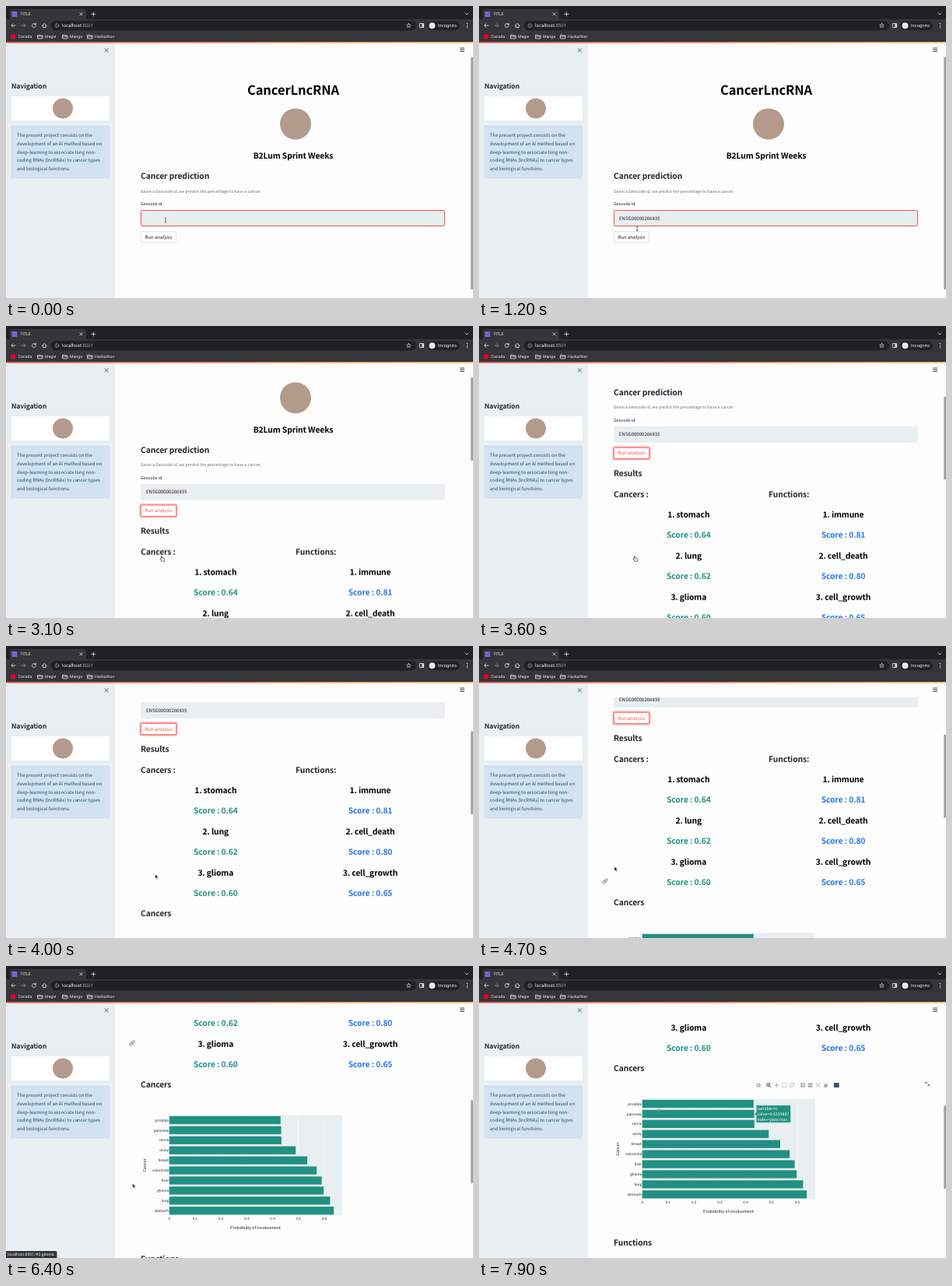
An HTML page that plays this animation: 600x375 px, repeating every 8 s.

```html
<!DOCTYPE html>
<html lang="en">
<head>
<meta charset="utf-8">
<title>Cancer prediction</title>
<style>
@property --s { syntax: "<number>"; inherits: true; initial-value: 0; }
html, body { margin: 0; width: 100%; height: 100%; overflow: hidden; background: #fdfdfd; }
svg { display: block; width: 600px; height: 375px; animation: scroll 8s linear infinite; }
text { font: 6.04px "Noto Sans CJK JP", "Noto Sans CJK SC", "Noto Sans CJK", "Open Sans", sans-serif; fill: #16171f; text-rendering: geometricPrecision; }
.ui { font-family: Roboto, sans-serif; font-size: 5.2px; fill: #e8eaed; }
.h1 { font-size: 16.5px; font-weight: 700; letter-spacing: -.005em; fill: #000; }
.h2 { font-size: 10.35px; font-weight: 700; letter-spacing: -.012em; fill: #262730; }
.nav { font-size: 8.6px; }
.black { fill: #000; }
.teal { fill: #229182; }
.blue { fill: #2b78e4; }
.info { fill: #12506a; font-size: 5.98px; }
.small { font-size: 5.25px; }
.tick { font-size: 4.57px; }
.grey { fill: #686b72; }
.white { fill: #fff; }
.mid { text-anchor: middle; }
.end { text-anchor: end; }
.red { fill: #ff4b4b; }
.line { fill: none; stroke: #e8eaed; stroke-width: .8; stroke-linecap: round; stroke-linejoin: round; }
.dim { stroke: #8a8e93; }
.tool { fill: none; stroke: #a9adb4; stroke-width: .9; }
#page { transform: translateY(calc(var(--s) * -1px)); }
#thumb { transform: translateY(calc(var(--s) * .33px)); }
#mouse { animation: mouse 8s linear infinite; }
@keyframes scroll {
  0%, 33.75% { --s: 0; }
  45% { --s: 133; }
  51.25%, 67.5% { --s: 204; }
  73.75% { --s: 297; }
  80% { --s: 381; }
  83.75%, 100% { --s: 402; }
}
@keyframes mouse {
  0%, 12% { transform: translate(205px, 275px); }
  18.5%, 46% { transform: translate(201px, 299px); }
  57.5%, 59.5% { transform: translate(174px, 284px); }
  63%, 78% { transform: translate(163px, 282px); }
  79%, 86% { transform: translate(162.5px, 280px); }
  90% { transform: translate(195px, 235px); }
  96%, 100% { transform: translate(231px, 185px); }
}
</style>
</head>
<body>
<svg id="stage" viewBox="0 0 600 375" xmlns="http://www.w3.org/2000/svg"></svg>
<script>
const LOOP = 8000;
const rules = new Map();

const text = (x, y, str, cls = "", attr = "") =>
  `<text x="${x}" y="${y}" class="${cls}" ${attr}>${str}</text>`;
const rect = (x, y, w, h, fill, attr = "") =>
  `<rect x="${x}" y="${y}" width="${w}" height="${h}" fill="${fill}" ${attr}/>`;
const dot = (x, y, r, fill) => `<circle cx="${x}" cy="${y}" r="${r}" fill="${fill}"/>`;
const path = (d, cls, attr = "") => `<path d="${d}" class="${cls}" ${attr}/>`;
const each = (list, fn) => list.map(fn).join("");

// Shows its content only within the given [from, to] spans, in ms.
function during(spans, content) {
  const name = "w" + spans.flat().join("_");
  const pct = ms => ms / LOOP * 100 + "%";
  rules.set(name, `@keyframes ${name}{0%{opacity:0}` +
    each(spans, ([a, b]) => `${pct(a)}{opacity:1}` + (b < LOOP ? `${pct(b)}{opacity:0}` : "")) + "}");
  return `<g style="animation:${name} 8s step-end infinite">${content}</g>`;
}

function browser() {
  const folder = x => path(`M${x} 37.2h2l.8.8h3.2v3.8h-6zM${x} 39h6`, "line");
  return rect(0, 0, 600, 18, "#202124") +
    path("M2 18q3 0 3-3V7q0-3 3-3h92q3 0 3 3v8q0 3 3 3z", "", 'fill="#35363a"') +
    rect(0, 17, 600, 29, "#35363a") +
    rect(7.5, 7, 7, 7, "#7a5cd6", 'rx="1"') + text(18.5, 12.4, "TITLE", "ui") +
    path("M95 8.8l3.2 3.2m0-3.2L95 12M109.8 10.4h5m-2.5-2.5v5M590 9l2 2 2-2", "line") +
    path("M12 25H7m2.2-2.3L6.9 25l2.3 2.3", "line") +
    path("M20 25h5m-2.2-2.3L25.1 25l-2.3 2.3", "line dim") +
    path("M38 23.6a2.5 2.5 0 1 0 .3 2.1M38.4 22v1.9h-1.9M46.5 25l2.8-2.6 2.8 2.6m-4.7-.5v3h3.8v-3", "line") +
    rect(58, 19, 469, 12.5, "#202124", 'rx="6.2"') +
    '<circle cx="65.5" cy="25.2" r="2.4" class="line dim"/>' + path("M65.5 25v1.4m0-2.5v0", "line dim") +
    text(72, 27.3, 'localhost<tspan fill="#9aa0a6">:8501</tspan>', "ui", 'style="font-size:6.1px"') +
    path("M517.5 22.3l.8 1.9 2 .1-1.6 1.3.6 2-1.8-1.1-1.8 1.1.6-2-1.6-1.3 2-.1z", "line", 'style="stroke-width:.6"') +
    path("M531.8 22.5h4.8v5h-4.8z", "line") + rect(534.5, 22.5, 2.2, 5, "#e8eaed") +
    rect(541, 19.5, 42, 11.5, "#202124", 'rx="5.7"') + dot(547.5, 25.2, 4, "#e8eaed") +
    text(555, 27.2, "Incognito", "ui", 'style="font-size:5.75px"') +
    each([22.5, 25, 27.5], y => dot(592.5, y, .7, "#e8eaed")) +
    rect(6, 36, 6, 6, "#e60023", 'rx="1"') + text(15.6, 41.2, "Canada", "ui") +
    each([[41, "Magie"], [73, "Manga"], [105, "Hackathon"]],
      ([x, s]) => folder(x) + text(x + 9, 41.2, s, "ui"));
}

function sidebar() {
  const lines = ["The present project consists on the", "development of an AI method based on",
    "deep-learning to associate long non-", "coding RNAs (lncRNAs) to cancer types", "and biological functions."];
  return rect(0, 46, 140, 329, "#e9eef1") +
    path("M127 54.6l4.6 4.6m0-4.6L127 59.2", "", 'stroke="#85888d" stroke-width="1.1"') +
    text(7, 106, "Navigation", "h2 nav") +
    rect(7, 116, 126, 31, "#fff") + dot(73, 131.5, 13, "#b39a8b") +
    rect(7, 153.5, 126, 67.5, "#d3e2f0", 'rx="1.7" stroke="#c6d9ea" stroke-width=".5"') +
    each(lines, (s, i) => text(14, 168.3 + i * 10.72, s, "info"));
}

function button(fill, border, cls, glow) {
  return (glow ? rect(172.3, 288.3, 47.4, 16.4, "none", 'rx="2.4" stroke="#ff4b4b" stroke-opacity=".5" stroke-width="1.5"') : "") +
    rect(173.4, 289.4, 45.2, 14.2, fill, `rx="1.7" stroke="${border}" stroke-width=".8"`) +
    text(196, 298.6, "Run analysis", cls + " mid");
}

function form() {
  const border = o => rect(173.5, 262.5, 390, 20, "none", `rx="1.7" stroke="#ff4b4b" stroke-opacity="${o}"`);
  return text(369, 114, "CancerLncRNA", "h1 mid") + dot(372, 151.5, 20, "#b39a8b") +
    text(369, 196, "B2Lum Sprint Weeks", "h2 black mid") +
    text(173, 222, "Cancer prediction", "h2") +
    text(173, 239.6, "Given a Gencode id, we predict the percentage to have a cancer.", "small grey") +
    text(173, 256, "Gencode id", "small") +
    rect(173, 262, 391, 21, "#e9eef1", 'rx="1.7"') +
    during([[0, 2100]], border(1)) + during([[2100, 2400]], border(.6)) +
    during([[400, LOOP]], text(180, 274.6, "ENSG00000266835")) +
    during([[0, 1500]], button("#fff", "#d6d8db", "")) +
    during([[1500, 2100]], button("#fff", "#ff4b4b", "red")) +
    during([[2100, 2300]], button("#ff4b4b", "#ff4b4b", "white", true)) +
    during([[2300, LOOP]], button("#fff", "#ff4b4b", "red", true));
}

function ranking(x, color, rows) {
  return each(rows, ([name, score], i) =>
    text(x, 379 + i * 52.8, `${i + 1}. ${name}`, "h2 black mid") +
    text(x, 405.3 + i * 52.8, `Score : ${score}`, `h2 ${color} mid`));
}

const bars = [["prostate", .4309], ["pancreas", .4333897], ["cervix", .4341], ["ovary", .4895], ["breast", .5342],
  ["colorectal", .5706], ["liver", .5899], ["glioma", .5978], ["lung", .6226], ["stomach", .6367]];
const barX = v => 209.7 + v * 332;
const barY = i => 579 + i * 12.92;

function tip(i) {
  const [name, value] = bars[i], x = barX(value), y = barY(i);
  return path(`M${x} ${y}l2.6-2v-9.2h44.4v22.6h-44.4v-9.2z`, "teal", 'stroke="#fff" stroke-width=".5"') +
    each(["variable=0", "value=" + value, "index=" + name],
      (s, k) => text(x + 3.8, y - 4.9 + k * 7, s, "small white"));
}

function modebar() {
  return path("M356.5 553.5h1.2l.6-1h1.6l.6 1h1.2v4h-5.2z", "", 'fill="#a9adb4"') + dot(359.1, 555.4, 1, "#fdfdfd") +
    path("M373.2 556.2l2.2 2.2M370.6 554.6h2.2m-1.1-1.1v2.2", "", 'stroke="#5d636d" stroke-width=".9"') +
    '<circle cx="371.7" cy="554.6" r="2.2" fill="none" stroke="#5d636d"/>' +
    path("M379.3 555h6.4m-3.2-3.2v6.4", "tool") +
    path("M389.8 552.4h5.2v5.2h-5.2z", "tool", 'stroke-dasharray="1.3 .8"') +
    path("M400.6 556.5c-2.5-2.5 0-4.2 2.4-4s3.6 2.6 1 3.6-3.4 0-3.4 2.4", "tool") +
    each([416, 425.6], x => rect(x - 2.8, 552.2, 5.6, 5.6, "#a9adb4")) +
    path("M414 555h4m-2-2v4M423.6 555h4", "", 'stroke="#fff" stroke-width=".8"') +
    path("M432.8 552.2l5.6 5.6m0-5.6l-5.6 5.6", "tool") +
    path("M442.4 555.3l3.2-3 3.2 3h-1v2.6h-4.4v-2.6z", "", 'fill="#a9adb4"') +
    rect(456, 552, 6.6, 6, "#3f4f75") +
    path("M573.8 553.3v-2h2m-2 0l1.8 1.8M578.4 553.5v2h-2m2 0l-1.8-1.8", "", 'fill="none" stroke="#55585f" stroke-width=".8"');
}

function chart() {
  const ticks = [0, .1, .2, .3, .4, .5, .6];
  return rect(209.7, 572.6, 222.3, 128.8, "#e9eef1") +
    each(ticks, v => rect(barX(v) - .25, 572.6, .5, 128.8, "#fff") + text(barX(v), 707, v, "tick mid")) +
    each(bars, ([name, v], i) => rect(209.7, barY(i) - 5.15, v * 332, 10.3, "#229182") +
      text(209, barY(i) + 1.6, name, "tick end")) +
    text(320.5, 718.6, "Probability of involvement", "small mid") +
    text(0, 0, "Cancer", "small mid", 'transform="translate(179.6 637) rotate(-90)"');
}

function link(y) {
  const half = x => rect(x, -1.4, 4.4, 2.8, "none", 'rx="1.4" stroke="#74777c" stroke-width=".9"');
  return `<g transform="translate(162 ${y}) rotate(-40)">${half(-4)}${half(-.4)}</g>`;
}

function results() {
  return text(173, 326, "Results", "h2") + text(173, 352.5, "Cancers :", "h2") + text(372, 352.5, "Functions:", "h2") +
    ranking(269.3, "teal", [["stomach", "0.64"], ["lung", "0.62"], ["glioma", "0.60"]]) +
    ranking(468, "blue", [["immune", "0.81"], ["cell_death", "0.80"], ["cell_growth", "0.65"]]) +
    text(173, 537, "Cancers", "h2") + chart() + text(173, 760.5, "Functions", "h2") +
    during([[4500, 4850]], link(506)) + during([[4850, 6700]], link(480)) +
    during([[7050, LOOP]], modebar()) +
    during([[7400, 7500]], tip(3)) + during([[7500, 7600]], tip(2)) + during([[7600, LOOP]], tip(1));
}

function cursors() {
  const outline = 'fill="#111" stroke="#fff" stroke-width=".6"';
  const stroke = (c, w) => `fill="none" stroke="${c}" stroke-width="${w}"`;
  return during([[0, 1300]], path("M-1.3-3q1.3 0 1.3 1v4q0 1-1.3 1M1.3-3Q0-3 0-2M1.3 3Q0 3 0 2M-.7.9h1.4", "", stroke("#333", .6))) +
    during([[1300, 3800], [4900, 6300]],
      path("M-1.6-3.2q.8-.8 1.3.2v2l2.6.5q.8.3.6 1.3l-.5 2.4h-3.4l-1.9-2.7q0-.8.8-.6l.5.5z", "", 'fill="#fff" stroke="#333" stroke-width=".7"')) +
    during([[3800, 4900], [6300, 7400]], path("M0-1v6.2l1.4-1.3 1 2.2 1-.5-1-2.1h2z", "", outline)) +
    during([[7400, LOOP]], path("M-3.5 0h7M0-3.5v7", "", stroke("#8fa3a1", .8)));
}

const thumb = (y, h, attr = "") => rect(597.2, y, 2.8, h, "#a3a3a3", 'rx="1.2" ' + attr);

document.getElementById("stage").innerHTML =
  '<defs><clipPath id="view"><path d="M140 66h460v309H140z"/></clipPath>' +
  '<linearGradient id="bar"><stop stop-color="#ff4b4b"/><stop offset="1" stop-color="#ffb458"/></linearGradient></defs>' +
  rect(0, 0, 600, 375, "#fdfdfd") +
  `<g clip-path="url(#view)"><g id="page">${form()}${during([[2500, LOOP]], results())}</g></g>` +
  sidebar() + browser() + rect(0, 46, 600, 1.6, "url(#bar)") +
  path("M583.2 54h5.8m-5.8 2.2h5.8m-5.8 2.2h5.8", "", 'stroke="#33353c" stroke-width=".9"') +
  during([[0, 2500]], thumb(65.5, 298.5)) + during([[2500, LOOP]], thumb(46.5, 107, 'id="thumb"')) +
  during([[5000, 6700]], rect(-2, 366, 67.5, 11, "#35363a", 'rx="2"') + text(2, 372.4, "localhost:8501/#3-glioma", "ui")) +
  `<g id="mouse">${cursors()}</g>`;

const sheet = document.createElement("style");
sheet.textContent = [...rules.values()].join("\n");
document.head.append(sheet);
</script>
</body>
</html>
```
